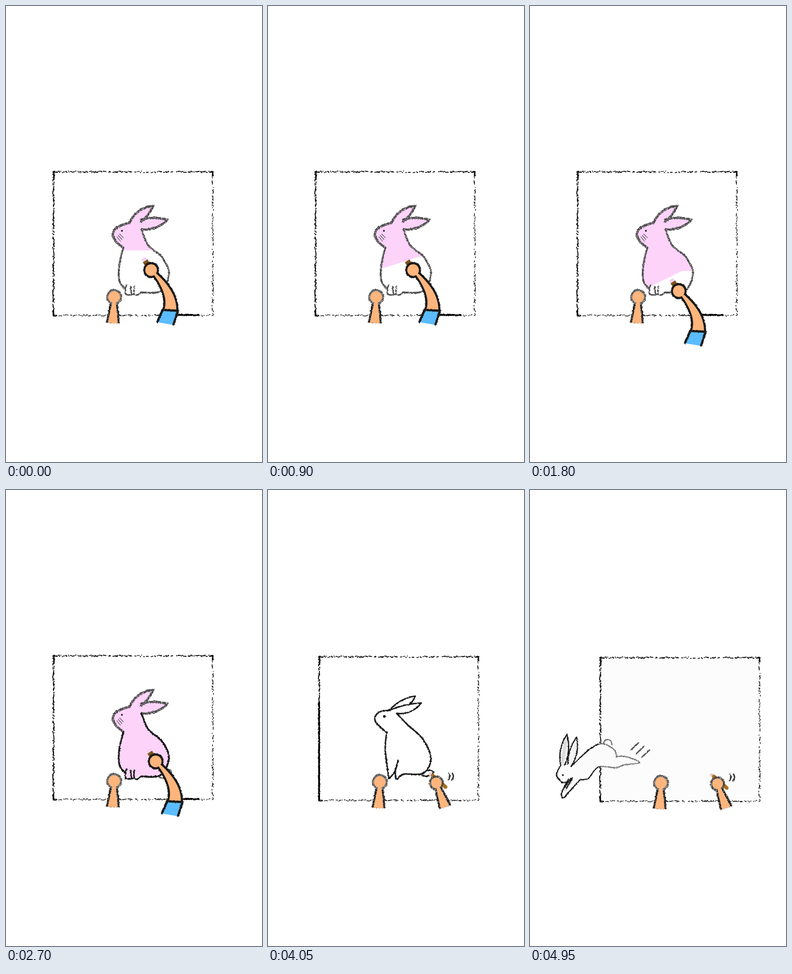
Recreate the animation shown at these times as an HTML page. Size 561 by 998 pixels, loop 5400 ms.

```html
<!DOCTYPE html>
<html lang="en">
<head>
<meta charset="utf-8">
<title>Painting a rabbit</title>
<style>
html, body { margin: 0; width: 100%; height: 100%; overflow: hidden; background: #fff; }
svg { display: block; width: 100%; height: 100%; }
</style>
</head>
<body>
<svg viewBox="0 0 561 998" fill="none" stroke-linecap="round" stroke-linejoin="round">
  <defs>
    <filter id="ink" filterUnits="userSpaceOnUse" x="0" y="330" width="561" height="440" color-interpolation-filters="sRGB">
      <feTurbulence type="fractalNoise" baseFrequency=".3" numOctaves="2" seed="4"/>
      <feColorMatrix values="1 0 0 0 0  0 1 0 0 0  0 0 1 0 0  0 0 0 0 1" result="n"/>
      <feDisplacementMap in="SourceGraphic" in2="n" scale="3.5" xChannelSelector="R" yChannelSelector="G"/>
    </filter>
    <filter id="chalk" filterUnits="userSpaceOnUse" x="0" y="330" width="561" height="440" color-interpolation-filters="sRGB">
      <feTurbulence type="fractalNoise" baseFrequency=".35" numOctaves="2" seed="9" result="t"/>
      <feColorMatrix values="1 0 0 0 0  0 1 0 0 0  0 0 1 0 0  0 0 0 0 1" result="n"/>
      <feDisplacementMap in="SourceGraphic" in2="n" scale="4" xChannelSelector="R" yChannelSelector="G" result="d"/>
      <feColorMatrix in="t" values="0 0 0 0 0  0 0 0 0 0  0 0 0 0 0  0 0 0 2.4 -.25" result="g"/>
      <feComposite in="d" in2="g" operator="in"/>
      <feGaussianBlur stdDeviation=".4"/>
    </filter>
    <linearGradient id="leap" gradientUnits="userSpaceOnUse" x1="148" x2="154" y1="0" y2="0">
      <stop stop-color="#1c1c1c"/><stop offset="1" stop-color="#777"/>
    </linearGradient>
  </defs>
  <g id="scene"></g>
</svg>
<script>
const STEP = 450, COUNT = 12;
const PINK = '#fdd3fa', SKIN = '#ffb57c', BLUE = '#5bbcff', INK = '#1a1a1a', GREY = '#484848';
const scene = document.getElementById('scene');

const fill = (d, color, more = '') => `<path d="${d}" fill="${color}" ${more}/>`;
const line = (d, width, color = INK) => `<path d="${d}" stroke="${color}" stroke-width="${width}"/>`;
const dot = (x, y, r, color = INK) => `<circle cx="${x}" cy="${y}" r="${r}" fill="${color}"/>`;
const group = (body, more) => `<g ${more}>${body}</g>`;
const ink = body => group(body, 'filter="url(#ink)"');
const chalk = body => group(body, 'filter="url(#chalk)"');
const shift = (x, y, body) => group(body, `transform="translate(${x} ${y})"`);
const repeat = (n, make) => Array.from({ length: n }, (_, i) => make(i)).join('');

// Smooth path through "x,y x,y ..." points
function curve(text, join = 'M') {
  const p = text.split(' ').map(s => s.split(',').map(Number));
  let d = join + p[0];
  for (let i = 0; i < p.length - 1; i++) {
    const a = p[i - 1] || p[i], b = p[i], c = p[i + 1], e = p[i + 2] || c;
    const out = b.map((v, j) => v + (c[j] - a[j]) / 6);
    const into = c.map((v, j) => v - (e[j] - b[j]) / 6);
    d += `C${out} ${into} ${c}`;
  }
  return d;
}
const flip = s => s.split(' ').reverse().join(' ');

// Ear: two bowed sides meeting at a tip
function ear(a, tip, b, bowA, bowB) {
  const bow = (p, q, k) => {
    const dx = q[0] - p[0], dy = q[1] - p[1], s = 2 * k / Math.hypot(dx, dy);
    return `Q${(p[0] + q[0]) / 2 + dy * s},${(p[1] + q[1]) / 2 - dx * s} ${q}`;
  };
  return 'M' + a + bow(a, tip, bowA) + bow(tip, b, bowB);
}

// Tapered limb along a quadratic curve; grow widens both sides
function limb(a, mid, b, w0, w1, grow) {
  const one = [], two = [];
  for (let t = 0; t <= 1; t += 1 / 16) {
    const u = 1 - t, at = j => u * u * a[j] + 2 * u * t * mid[j] + t * t * b[j];
    const go = j => u * (mid[j] - a[j]) + t * (b[j] - mid[j]);
    const s = (w0 + (w1 - w0) * t ** .8 + grow) / 2 / Math.hypot(go(0), go(1));
    one.push([at(0) - go(1) * s, at(1) + go(0) * s]);
    two.unshift([at(0) + go(1) * s, at(1) - go(0) * s]);
  }
  return 'M' + [...one, ...two].join('L') + 'Z';
}

// Fist and forearm share one outline
function forearm(hand, mid, end, r, w0, w1, wrap, color) {
  const shape = (grow, limbColor, handColor) =>
    fill(limb(hand, mid, end, w0, w1, grow), limbColor) + dot(...hand, r + grow / 2, handColor);
  return wrap(shape(5, INK, color)) + shape(-4.5, SKIN, SKIN);
}

// Speckled paper edge
function makeEdges() {
  let seed = 17;
  const rnd = () => (seed = seed * 16807 % 2147483647) / 2147483647;
  const edge = (x, y, len, down, density, width) => {
    let d = '';
    for (let s = 0; s < len; s += 1.5) {
      if (rnd() > density) continue;
      const off = (rnd() - .5) * 3.4, run = .3 + rnd() * 2.2;
      d += down ? `M${x + off} ${y + s}v${run}` : `M${x + s} ${y + off}h${run}`;
    }
    return line(d, width, '#000');
  };
  return edge(105, 363, 349, false, .6, 1.8) + edge(104, 363, 314, true, .8, 2)
    + edge(453, 364, 312, true, .55, 1.5) + edge(105, 677, 348, false, .55, 1.5)
    + ink(line('M105 362V379M104 668V678H111M449 363H453V371', 3, '#000'));
}
const EDGES = makeEdges();
const paper = (stroke = '') => EDGES + (stroke && ink(line(stroke, 3.8, '#000')));

// Sitting rabbit
const EARS = ear([271, 474], [323, 437], [296, 472], 9, 3) + ear([297, 467], [354, 468], [297, 489], 4, 7);
const HEAD = '271,474 244,484 234,500 242,517 257,529';
const CHEST = '257,529 248,570 249,603 262,620';
const BACK = '297,489 312,524 342,550 357,586 339,624 296,627';
const FEET = 'M264 611Q260 624 262 631Q270 634 279 631M273 614L275 630M281 613Q280 624 281 630Q286 637 297 626';
const BODY = curve(HEAD) + curve(CHEST, 'L') + 'L262 631H280' + curve(flip(BACK), 'L') + 'V467Z';
const TAIL = 'M335 628Q343 612 357 612Q369 616 353 627Q342 634 335 628Z';

function sitting([left, right], width, color, tail) {
  const lower = line(curve(CHEST) + curve(BACK), width, color) + line(FEET, width * .8, color);
  return `<clipPath id="cut"><path d="M200 400H400V${right}H333L255 ${left}H200Z"/></clipPath>`
    + (tail ? fill(TAIL, tail) + chalk(line(TAIL, 3.6, GREY)) : '')
    + fill(BODY, '#fff') + fill(BODY, PINK, 'clip-path="url(#cut)"') + fill(EARS, PINK)
    + chalk(line(EARS + curve(HEAD), 5.2, GREY))
    + (color === INK ? ink(lower) : chalk(lower))
    + dot(254, 492, 2)
    + line(repeat(3, i => `M${243 + 3 * i} ${505 - 3 * i}l8 ${10 - i}`), 1.2, '#444');
}

// Painting arm, reaching up or bent to the left
const POSES = {
  up: { hand: [318, 578], elbow: [367, 627], angle: -123 },
  bent: { hand: [288, 594], elbow: [368, 609], angle: -143 }
};
function arm({ hand, elbow, angle }, x, y) {
  const brush = fill('M22 -5H31V5H22Z', '#f6d0f5') + fill('M12 -6H24V6H12Z', '#7d531c');
  return shift(x, y, group(brush, `transform="translate(${hand}) rotate(${angle})"`)
    + forearm(hand, elbow, [360, 667], 15, 6, 31, ink, INK)
    + fill('M343 665L377 667L367 698L331 692Z', BLUE)
    + ink(line('M332 691L343 665L377 667L367 697', 5)));
}

// Resting hands
const leftHand = () => forearm([237, 637], [236, 665], [234, 694], 15, 6, 26, chalk, '#555');
const marks = (x, y) => line(repeat(2, i => `M${x + 8 * i} ${y}q5 7 -1 14`), 3, '#333');
const hands = () => leftHand()
  + dot(348, 620, 4, '#e8cbd5') + line('M353 623L381 648', 8, '#a8701f')
  + forearm([361, 639], [370, 665], [380, 692], 14, 7, 24, chalk, '#444')
  + ink(marks(388, 618));

// Alert rabbit
function alert(perked) {
  const shape = ear([266, 482], [323, 451], [308, 470], 6, 2) + ear([266, 482], [336, 466], [282, 489], 3, 8);
  return ink(
    line(curve('266,482 242,487 235,506 260,531') + curve('260,531 257,570 265,632')
      + curve('265,632 278,616 285,592')
      + curve('279,612 281,633 297,622 340,620 357,588 340,546 305,513 282,489'), 3.4)
    + line('M338 622Q350 608 364 617Q352 630 338 625', 2.8)
    + group(line(shape, 3.2), `transform="rotate(${perked ? -28 : 0} 268 484)"`)
  ) + dot(255, 495.5, 3);
}

// Leaping rabbit
function leaping() {
  const ears = ear([67, 603], [81, 535], [76, 602], 7, 6) + ear([83, 600], [102, 541], [90, 605], 5, 7);
  const back = '90,605 130,568 158,555 184,568 190,584';
  const leg = '190,584 208,583 240,596 205,602 188,608 150,606 128,631 110,634';
  const paw = '110,634 88,658 73,674 70,660 90,631';
  const face = '67,603 58,624 71,641';
  return fill([back, leg, paw, flip(face)].map((s, i) => curve(s, i ? 'L' : 'M')).join('') + 'Z', '#fbfbfb')
    + fill(ears, '#f4f4f4')
    + line('M71 595L78 552M77 656L90 634', 7, '#ddd')
    + ink(line(ears + [back, leg, paw, face].map(s => curve(s)).join('')
      + 'M71 640H81M84 633L75 650M93 630L80 653', 2.8, 'url(#leap)')
      + line('M161 556Q162 546 171 546Q180 548 179 558', 2.8, '#777')
      + line(repeat(3, i => `M${238 + 12 * i} ${553 + 8 * i}l-17 16`), 3, '#555'))
    + dot(72, 624, 2);
}

// Paint line at the left and right for each stroke of the brush
const LEVELS = [[535, 535], [535, 535], [573, 548], [602, 550], [618, 580]];
const FULL = [640, 640];

function picture(i) {
  if (i < 7) {
    const move = i < 4 ? [0, 0] : i === 4 ? [8, 46] : [10, 16];
    const rabbit = LEVELS[i] ? sitting(LEVELS[i], 4, GREY) : sitting(FULL, 4, INK, '#fff');
    return paper('M378 676H422') + rabbit + leftHand() + arm(i % 2 ? POSES.bent : POSES.up, ...move);
  }
  if (i < 9) return paper() + (i < 8 ? sitting(FULL, 4, INK, '#fff') : sitting(FULL, 5.2, GREY, '#eed9e6')) + hands();
  if (i < 11) return shift(8, 2, paper('M104 463V677')) + alert(i === 10) + shift(8, 2, hands());
  return shift(50, 4, fill('M104 363H453V677H104Z', '#fcfcfc') + paper()) + leaping() + shift(50, 4, hands());
}

let shown = -1;
const start = performance.now();
function draw(now) {
  const i = Math.floor(Math.max(0, now - start) / STEP) % COUNT;
  if (i !== shown) scene.innerHTML = picture(shown = i);
  requestAnimationFrame(draw);
}
draw(start);
</script>
</body>
</html>
```
